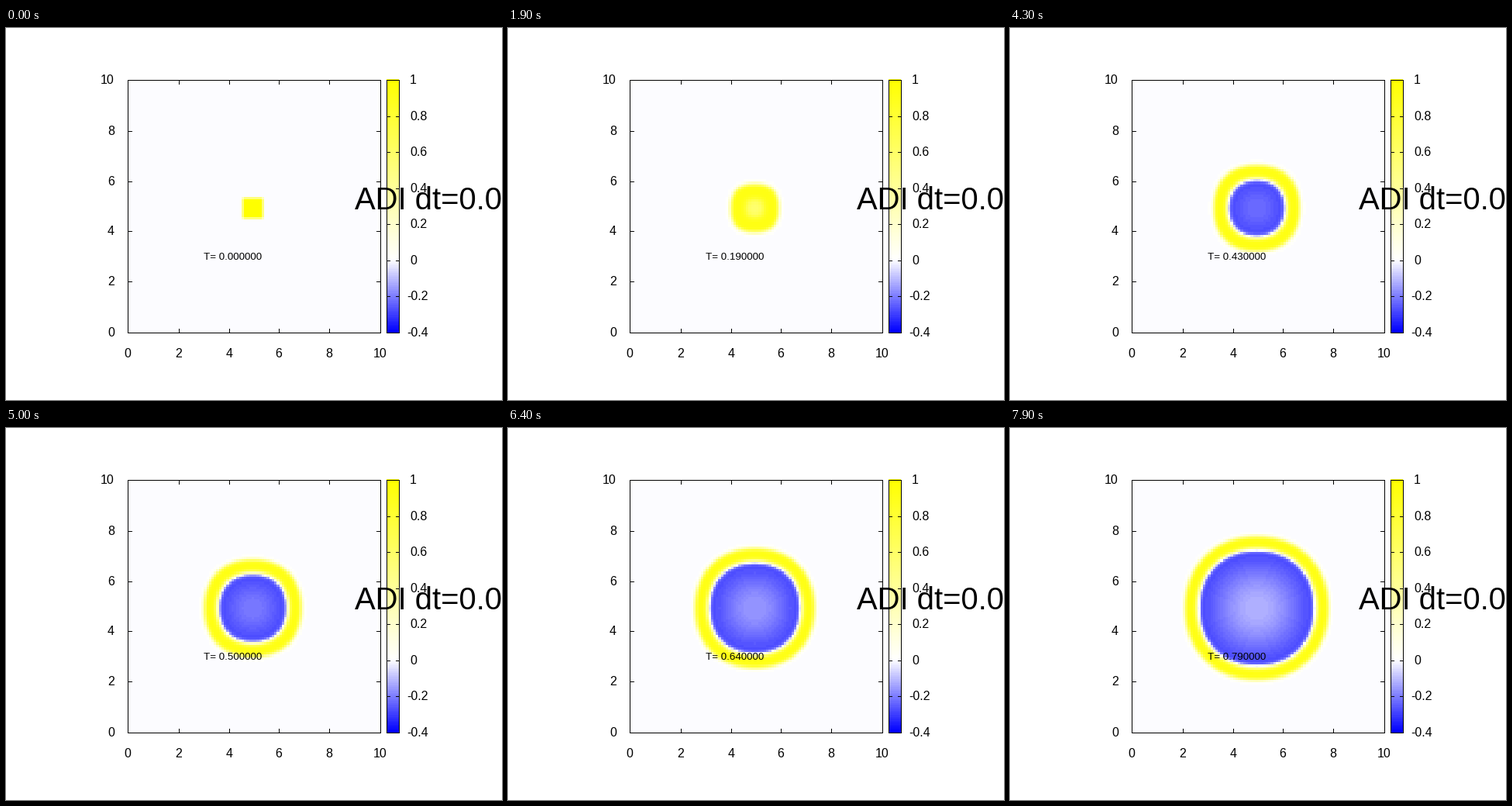
Recreate the animation shown at these times as a matplotlib script. Size 640 px wide and 480 px high, loop 8 s.

```python
import numpy as np
import matplotlib.pyplot as plt
from matplotlib.animation import FuncAnimation

W, H, DPI = 640, 480, 100
FRAMES, INTERVAL, DT = 80, 100, 0.01
LEFT, RIGHT, TOP, BOTTOM = 157, 483, 67, 393
SPAN = RIGHT - LEFT
UNIT = (SPAN - 2) / 10  # the data area sits one pixel inside the border
BAR_L, BAR_R = 491, 507
LOW, HIGH, LEVELS = -0.4, 1.0, 128
DIGIT = 8.9  # advance of one digit at 16 px

plt.rcParams["font.family"] = "Liberation Sans"

grid = np.arange(100) * 0.1 - 4.95
DX, DY = np.abs(np.meshgrid(grid, grid))


def palette(u):
    """Blue - white - yellow, in 128 flat steps."""
    gray = (np.asarray(u) - LOW) / (HIGH - LOW)
    step = np.clip(np.floor(gray * LEVELS), 0, LEVELS - 1)
    v = LOW + step / (LEVELS - 1) * (HIGH - LOW)
    warm = np.clip(1 + v / -LOW, 0, 1)
    return np.stack([warm, warm, np.clip(1 - v, 0, 1)], axis=-1)


def wave(t):
    """Excitation pulse spreading from a square, followed by slow recovery."""
    if t == 0:
        return np.where(np.maximum(DX, DY) < 0.4, 1.0, 0.0)
    p = 2.1 + 0.6 * np.exp(-t / 0.3) + 4 * np.exp(-t / 0.05)
    r = (DX**p + DY**p) ** (1 / p)
    edge = 0.35 + 3.17 * t
    front = 0.5 * (1 - np.tanh((r - edge) / 0.065))
    peak = 0.92 + 0.08 * np.exp(-t / 0.03)
    drop = 0.11 + (0.135**4 + (r / 3.27) ** 4) ** 0.25
    rest = np.maximum(t - drop, 0)
    trough = -0.28 * np.exp(-((rest / 0.6) ** 1.4))
    fall = 0.5 * (1 + np.tanh((t - drop + 0.044) / 0.025))
    return front * (peak * (1 - fall) + trough * fall)


def cells(t):
    """Each cell takes the mean of its four corners."""
    u = wave(t)
    return palette((u[1:, 1:] + u[1:, :-1] + u[:-1, 1:] + u[:-1, :-1]) / 4)


fig = plt.figure(figsize=(W / DPI, H / DPI), dpi=DPI, facecolor="white")
ax = fig.add_axes([0, 0, 1, 1])
ax.axis("off")


def line(xs, ys):
    ax.plot(xs, ys, color="black", lw=0.72, antialiased=False,
            solid_capstyle="projecting", zorder=3)


def box(x0, y0, x1, y1):
    line([x0, x1, x1, x0, x0], [y0, y0, y1, y1, y0])


def text(x, y, s, px=16):
    return ax.text(x, y, s, fontsize=px * 72 / DPI, color="black",
                   ha="left", va="baseline", zorder=4)


def picture(rgb, x0, x1, y0, y1):
    return ax.imshow(rgb, extent=(x0, x1, y0, y1), origin="lower",
                     aspect="auto", interpolation="nearest", zorder=1)


x0, y0 = LEFT + 1, BOTTOM
field = picture(cells(0), x0, x0 + 9.9 * UNIT, y0, y0 - 9.9 * UNIT)
ramp = LOW + (np.arange(LEVELS) + 0.5) / LEVELS * (HIGH - LOW)
picture(palette(ramp)[:, None, :], BAR_L, BAR_R, BOTTOM + 0.5, TOP)

box(LEFT, TOP, RIGHT, BOTTOM)
box(BAR_L, TOP, BAR_R, BOTTOM)

inner = [round(1 + k * UNIT) for k in (2, 4, 6, 8)]
for d in inner:
    x, y = LEFT + d, TOP + d
    line([x, x], [BOTTOM, BOTTOM - 5])
    line([x, x], [TOP, TOP + 5])
    line([LEFT, LEFT + 5], [y, y])
    line([RIGHT, RIGHT - 5], [y, y])

for i, d in enumerate([0, *inner, SPAN]):
    s, up = str(2 * i), str(10 - 2 * i)
    text(LEFT + d - DIGIT * len(s) / 2, 425, s)
    text(140 - DIGIT * len(up), TOP + d + 5, up)

for k in range(-2, 6):
    y = round(BOTTOM - (k + 2) / 7 * SPAN)
    if -2 < k < 5:
        line([BAR_L, BAR_L + 4], [y, y])
        line([BAR_R, BAR_R - 4], [y, y])
    text(517 if k < 0 else 521, y + 5, f"{k / 5:g}")

text(450, 234, "ADI dt=0.0", 40)
clock = text(255, 299, "", 40 / 3)

ax.set_xlim(0, W)
ax.set_ylim(H, 0)


def update(n):
    t = n * DT
    field.set_data(cells(t))
    clock.set_text(f"T= {t:.6f}")
    return field, clock


anim = FuncAnimation(fig, update, frames=FRAMES, interval=INTERVAL,
                     repeat=True, repeat_delay=0, blit=False)
plt.show()
```
